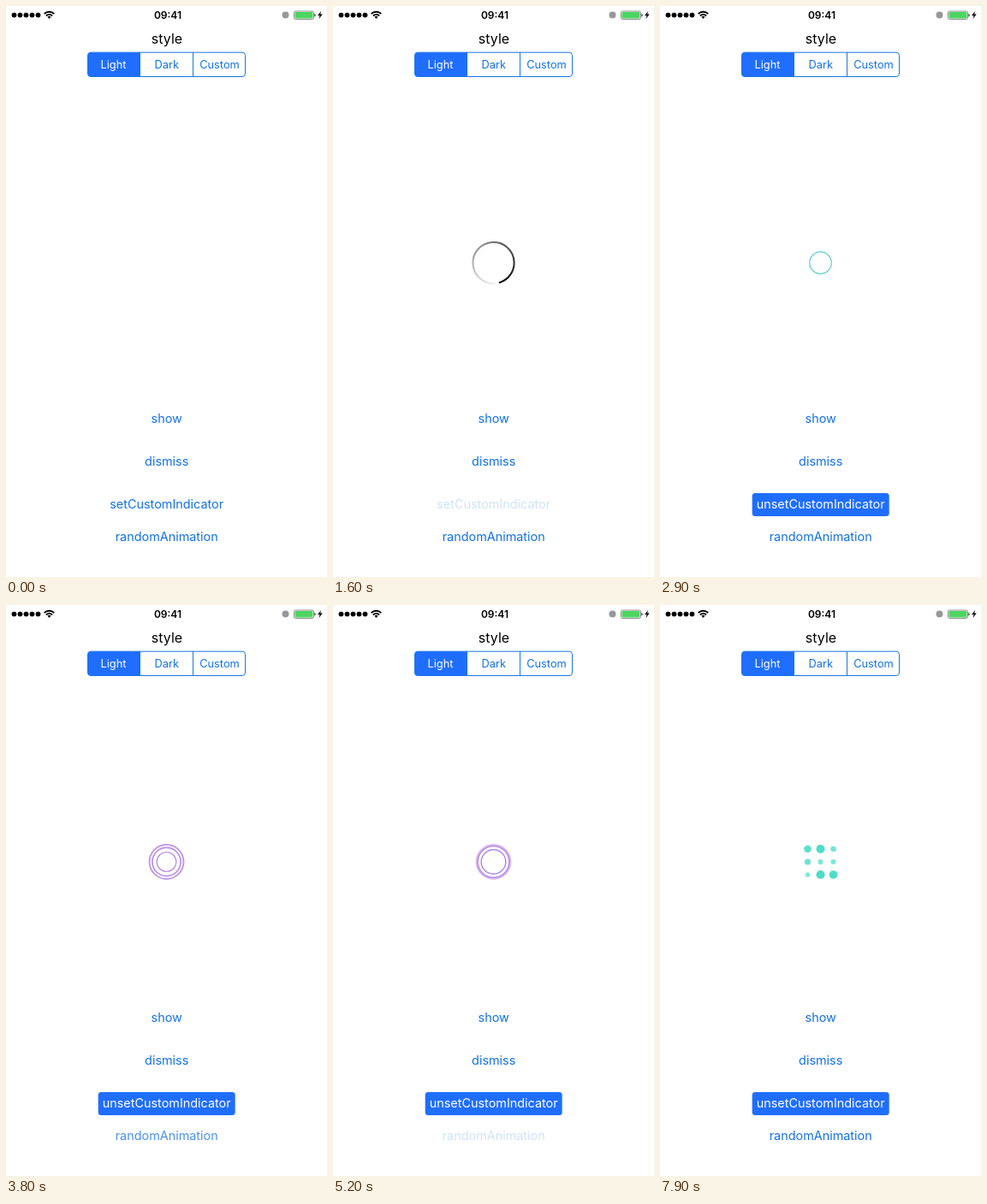
Write an HTML page with a canvas that moves like this. It is 375 px wide and 667 px high and loops after 8000 ms.

```html
<!DOCTYPE html>
<html lang="en">
<head>
<meta charset="utf-8">
<title>Indicator demo</title>
<style>
html, body { margin: 0; width: 100%; height: 100%; overflow: hidden; background: #fff; }
svg, canvas { position: absolute; left: 0; top: 0; width: 375px; height: 667px; }
text { font-family: Inter, Roboto, sans-serif; text-anchor: middle; }
.btn { font-size: 14.4px; fill: #1272de; }
.seg { font-size: 12.8px; fill: #1272de; }
.seg.on { fill: #fff; }
</style>
</head>
<body>
<svg viewBox="0 0 375 667">
  <!-- status bar -->
  <g id="signal"></g>
  <g fill="none" stroke="#000" stroke-width="1.9">
    <path d="M44.7 9.2a8.2 8.2 0 0 1 11.6 0"/>
    <path d="M46.9 11.5a5.1 5.1 0 0 1 7.2 0"/>
  </g>
  <path d="M48.5 12.8a2.9 2.9 0 0 1 4 0l-2 2.1z"/>
  <text x="189" y="14.6" font-size="12" font-weight="600">09:41</text>
  <circle cx="326.5" cy="10.5" r="4" fill="#98989c"/>
  <rect x="336.5" y="6" width="23" height="9.5" rx="1.8" fill="#fff" stroke="#8b8b8f" stroke-width="1"/>
  <rect x="337.5" y="7" width="21" height="7.5" rx="1" fill="#4cd55f"/>
  <path d="M360.4 9q1.3.2 1.3 1.7t-1.3 1.7z" fill="#333"/>
  <path d="M368.3 5.8l-4.3 5.5h2.6l-1.2 3.9 4.4-5.6h-2.7z"/>

  <!-- style picker -->
  <text x="188" y="44" font-size="16">style</text>
  <path d="M157 54.2H99a3.5 3.5 0 0 0-3.5 3.5V79a3.5 3.5 0 0 0 3.5 3.5h58z" fill="#1f6eff"/>
  <rect x="95.5" y="54.2" width="184" height="28.3" rx="3.5" fill="none" stroke="#1a76e4"/>
  <path d="M156.5 54v28.5M218.5 54v28.5" stroke="#1a76e4"/>
  <text class="seg on" x="125.5" y="73">Light</text>
  <text class="seg" x="187.8" y="73">Dark</text>
  <text class="seg" x="249.5" y="73">Custom</text>

  <!-- buttons -->
  <text class="btn" id="show" x="187.7" y="487">show</text>
  <text class="btn" x="187.7" y="537">dismiss</text>
  <rect id="fill" x="107.7" y="569" width="160" height="27" rx="3.5" fill="#1f6eff"/>
  <text class="btn" id="custom" x="187.7" y="587.2">setCustomIndicator</text>
  <text class="btn" id="random" x="187.7" y="625.2">randomAnimation</text>
</svg>
<canvas id="stage"></canvas>
<script>
const LOOP = 8000, TAU = Math.PI * 2, CX = 187.5, CY = 300;
const SHOW = 700, CUSTOM = 1900, RIPPLES = 3530, ZIGZAG = 5704, GRID = 7260;
const $ = id => document.getElementById(id);
const clamp = x => Math.min(1, Math.max(0, x));
const mod = (a, n) => ((a % n) + n) % n;

for (let i = 0; i < 5; i++) {
  const dot = document.createElementNS('http://www.w3.org/2000/svg', 'circle');
  dot.setAttribute('cx', 9.5 + i * 7);
  dot.setAttribute('cy', 10.6);
  dot.setAttribute('r', 2.9);
  $('signal').append(dot);
}

const canvas = $('stage'), ctx = canvas.getContext('2d');
const dpr = window.devicePixelRatio || 1;
canvas.width = 375 * dpr;
canvas.height = 667 * dpr;

function bezier(x1, y1, x2, y2) {
  const at = (s, a, b) => 3 * (1 - s) * (1 - s) * s * a + 3 * (1 - s) * s * s * b + s * s * s;
  return x => {
    let lo = 0, hi = 1;
    for (let i = 0; i < 22; i++) {
      const mid = (lo + hi) / 2;
      if (at(mid, x1, x2) < x) lo = mid; else hi = mid;
    }
    return at((lo + hi) / 2, y1, y2);
  };
}
const ease = bezier(.25, .1, .25, 1);
const grow = bezier(.21, .53, .56, .8);

function disc(x, y, r, color, alpha = 1) {
  ctx.globalAlpha = alpha;
  ctx.fillStyle = color;
  ctx.beginPath();
  ctx.arc(x, y, r, 0, TAU);
  ctx.fill();
}

function spinner(t) {
  const head = TAU * (.2 + (t - 1600) / 1000);
  const shade = ctx.createConicGradient(mod(head + .12, TAU), CX, CY);
  shade.addColorStop(0, 'rgba(0,0,0,.03)');
  shade.addColorStop(1, 'rgba(0,0,0,1)');
  ctx.globalAlpha = clamp((t - SHOW) / 150);
  ctx.strokeStyle = shade;
  ctx.lineWidth = 2.1;
  ctx.lineCap = 'round';
  ctx.beginPath();
  ctx.arc(CX, CY, 24.1, head + .25, head + TAU);
  ctx.stroke();
}

// Ring that grows for 70% of its cycle, then fades away
function ripple(sec, period, color) {
  const p = mod(sec, period) / period;
  const scale = .1 + .9 * grow(clamp(p / .7));
  ctx.globalAlpha = p < .7 ? 1 - .3 * p / .7 : .7 * (1 - p) / .3;
  ctx.strokeStyle = color;
  ctx.lineWidth = 2 * scale;
  ctx.beginPath();
  ctx.arc(CX, CY, 20 * scale, 0, TAU);
  ctx.stroke();
}

function zigzag(sec) {
  const d = 16, p = mod(sec, .75) / .75 * 3;
  let x, y;
  if (p < 1) { x = -d * p; y = -d * p; }
  else if (p < 2) { x = d * (2 * p - 3); y = -d; }
  else { x = d * (3 - p); y = -d * (3 - p); }
  disc(CX + x, CY + y, 4, '#9f6fca');
  disc(CX - x, CY - y, 4, '#9f6fca');
}

const periods = [.72, 1.02, 1.28, 1.42, 1.45, 1.18, .87, 1.45, 1.06];
const offsets = [-.13, .24, -.38, .25, .2, .04, .5, .65, .47];

function grid(sec) {
  periods.forEach((period, i) => {
    const p = mod(sec + offsets[i], period) / period;
    const shrink = p < .5 ? ease(p * 2) : 1 - ease(p * 2 - 1);
    const x = CX + (i % 3 - 1) * 15, y = CY + (Math.floor(i / 3) - 1) * 15;
    disc(x, y, 5.1 * (1 - .5 * shrink), '#4adcc6', 1 - .35 * shrink);
  });
}

// Button opacity: dims on touch, recovers after release
function touch(t, down, up) {
  if (t < down) return 1;
  if (t < up) return 1 - .8 * clamp((t - down) / 60);
  return .2 + .8 * clamp((t - up) / 380);
}

function draw(t) {
  const custom = t >= CUSTOM;
  $('show').style.opacity = touch(t, 350, SHOW);
  $('fill').style.opacity = custom ? 1 : 0;
  $('custom').textContent = custom ? 'unsetCustomIndicator' : 'setCustomIndicator';
  $('custom').style.fill = custom ? '#fff' : '#1272de';
  $('custom').style.opacity = custom ? 1 : touch(t, 1400, CUSTOM);
  $('random').style.opacity = Math.min(
    touch(t, 3200, RIPPLES), touch(t, 5000, ZIGZAG), touch(t, 6950, GRID));

  ctx.setTransform(dpr, 0, 0, dpr, 0, 0);
  ctx.clearRect(0, 0, 375, 667);
  if (t >= GRID) grid((t - GRID) / 1000);
  else if (t >= ZIGZAG) zigzag((t - ZIGZAG) / 1000);
  else if (t >= RIPPLES) {
    for (let i = 0; i < 3; i++) ripple((t - RIPPLES) / 1000 + i * .3, 1.25, '#a970dc');
  }
  else if (custom) ripple((t - 1630) / 1000, 1, '#55c6c6');
  else if (t >= SHOW) spinner(t);
}

const begin = performance.now();
function tick() {
  draw((performance.now() - begin) % LOOP);
  requestAnimationFrame(tick);
}
tick();
</script>
</body>
</html>
```
